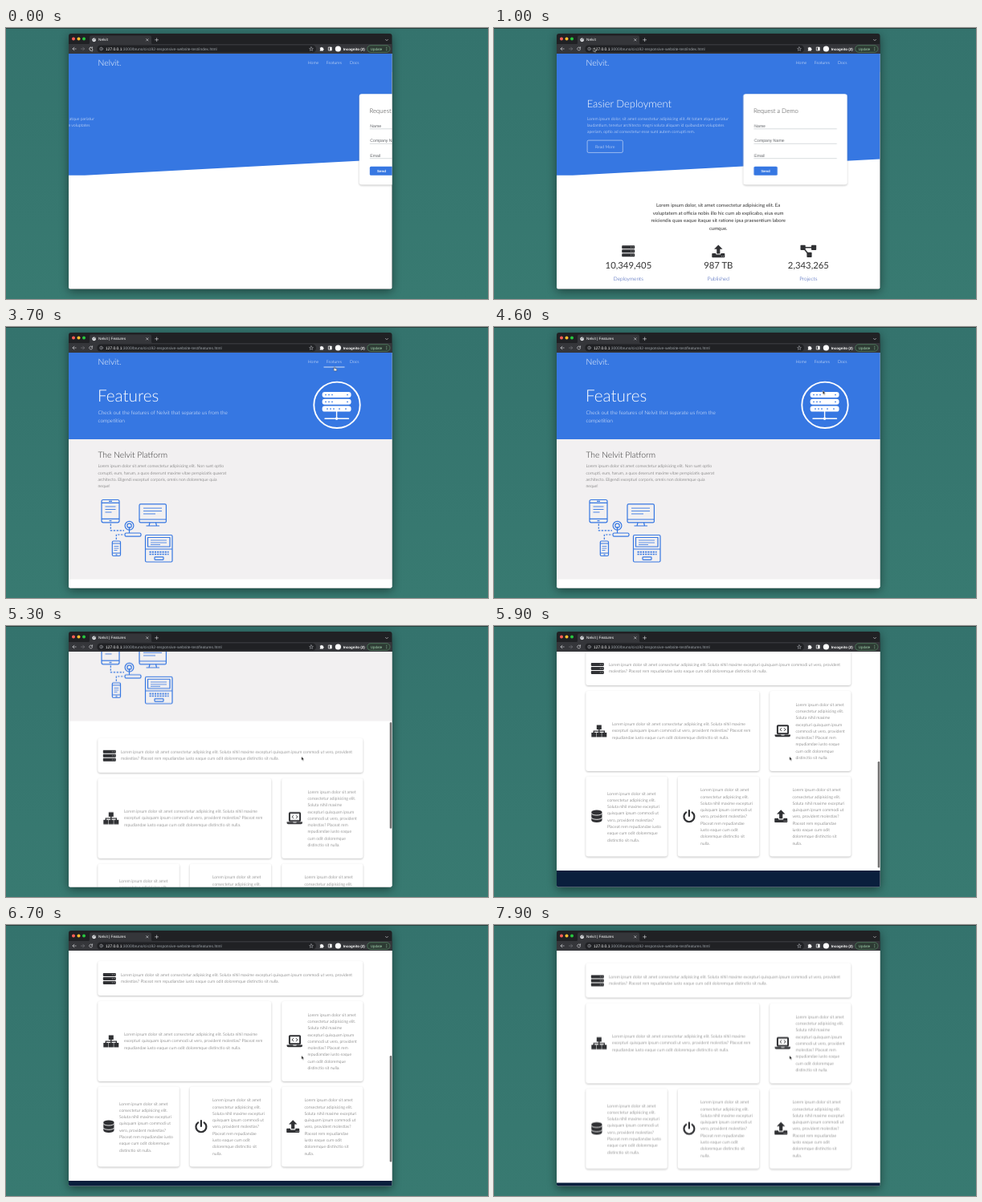
An HTML page that plays this animation: 600x338 px, repeating every 8000 ms.

```html
<!DOCTYPE html>
<html lang="en">
<head>
<meta charset="utf-8">
<title>Website preview</title>
<style>
html, body { margin: 0; width: 100%; height: 100%; overflow: hidden; background: #36766f; }
svg { display: block; width: 100vw; height: 100vh; }
text { font-family: Lato, sans-serif; font-weight: 300; font-size: 5.18px; text-rendering: geometricPrecision; white-space: pre; }
.ui, .ui text { font-family: "Liberation Sans", Arial, sans-serif; font-weight: 400; }
.mid { text-anchor: middle; }
.white { fill: #fff; }
.body { fill: #484848; }
.link { fill: #1c3fa8; font-size: 6.47px; }
.count { font-size: 11.32px; font-weight: 400; }
.blue { fill: #3677e2; }
.card { fill: #fff; filter: drop-shadow(0 1px 1.2px rgba(0, 0, 0, .24)); }
.frame { filter: drop-shadow(0 3px 6px rgba(0, 0, 0, .45)); }
.line { fill: none; stroke: #fff; stroke-width: .8; stroke-linecap: round; stroke-linejoin: round; }
.dev { fill: none; stroke: #3677e2; stroke-width: 1.2; stroke-linejoin: round; }
.icon { fill: #303134; }

.from-left, .from-right, .from-below, .scroll, .thumb, .fade, .cursor,
.first, .second, .hover, .arrow { animation: 8s infinite both; }

.from-left { animation-name: fromLeft; }
.from-right { animation-name: fromRight; }
.from-below { animation-name: fromBelow; }
@keyframes fromLeft { 0% { transform: translateX(-182px); animation-timing-function: ease-in; } 12.5%, 100% { transform: none; } }
@keyframes fromRight { 0% { transform: translateX(129.4px); animation-timing-function: ease-in; } 12.5%, 100% { transform: none; } }
@keyframes fromBelow { 0% { transform: translateY(122px); animation-timing-function: ease-in; } 12.5%, 100% { transform: none; } }

.first, .second, .hover, .arrow { animation-timing-function: steps(1, end); }
.first { animation-name: first; }
.second { animation-name: second; }
.hover { animation-name: hover; }
.arrow { animation-name: arrow; }
@keyframes first { 0% { opacity: 1; } 41.25%, 100% { opacity: 0; } }
@keyframes second { 0% { opacity: 0; } 41.25%, 100% { opacity: 1; } }
@keyframes hover { 0% { opacity: 0; } 31.5% { opacity: 1; } 47%, 100% { opacity: 0; } }
@keyframes arrow { 0% { opacity: 1; } 31.5% { opacity: 0; } 47%, 100% { opacity: 1; } }

.scroll { animation-name: scroll; animation-timing-function: ease-in-out; }
.thumb { animation-name: thumb; animation-timing-function: ease-in-out; }
.fade { animation-name: fade; }
@keyframes scroll {
  0%, 61% { transform: none; }
  70%, 73.75% { transform: translateY(-305px); }
  83.75% { transform: translateY(-291px); }
  90%, 100% { transform: translateY(-288.5px); }
}
@keyframes thumb {
  0%, 61% { transform: none; }
  70%, 73.75% { transform: translateY(137px); }
  83.75% { transform: translateY(131px); }
  90%, 100% { transform: translateY(129.8px); }
}
@keyframes fade { 0%, 60.5% { opacity: 0; } 61.5%, 91% { opacity: 1; } 94%, 100% { opacity: 0; } }

.cursor { animation-name: cursor; animation-timing-function: ease-in-out; }
@keyframes cursor {
  0%, 4% { transform: translate(105px, 23.8px); }
  12.5%, 15% { transform: translate(123.7px, 24.8px); }
  32.5%, 44% { transform: translate(408.3px, 45.4px); }
  53%, 59% { transform: translate(409.3px, 79.2px); }
  66%, 100% { transform: translate(367.8px, 162.8px); }
}
</style>
</head>
<body>
<svg viewBox="0 0 600 338" preserveAspectRatio="none">
  <defs>
    <linearGradient id="wall" x2="0" y2="1">
      <stop stop-color="#34736d"/><stop offset="1" stop-color="#387a71"/>
    </linearGradient>
    <clipPath id="view"><path d="M78 32H480.5V323.5a2 2 0 0 1-2 2H80a2 2 0 0 1-2-2z"/></clipPath>

    <g id="nav">
      <rect class="blue" x="78" y="31.5" width="403" height="23.5"/>
      <g class="white">
        <text x="114.6" y="47.2" style="font-size:10.35px">Nelvit.</text>
        <text x="375.7" y="45.2">Home</text>
        <text x="398.8" y="45.2">Features</text>
        <text x="428" y="45.2">Docs</text>
      </g>
    </g>

    <!-- icons are centred on 0,0 -->
    <g id="server">
      <path class="icon" d="M-7.2-7H7.2a.8.8 0 0 1 .8.8v2.4a.8.8 0 0 1-.8.8H-7.2a.8.8 0 0 1-.8-.8v-2.4a.8.8 0 0 1 .8-.8zM-7.2-2H7.2a.8.8 0 0 1 .8.8v2.4a.8.8 0 0 1-.8.8H-7.2a.8.8 0 0 1-.8-.8v-2.4a.8.8 0 0 1 .8-.8zM-7.2 3H7.2a.8.8 0 0 1 .8.8v2.4a.8.8 0 0 1-.8.8H-7.2a.8.8 0 0 1-.8-.8v-2.4a.8.8 0 0 1 .8-.8z"/>
      <path class="line" stroke-width="1.2" d="M3.5-5h0M6-5h0M3.5 0h0M6 0h0M3.5 5h0M6 5h0"/>
    </g>
    <g id="upload">
      <path class="icon" d="M0-8 5.2-2.6H2.1V3H-2.1V-2.6H-5.2z"/>
      <path class="icon" d="M-7.2 2.5H-3.2V3.2a1 1 0 0 0 1 1H2.2a1 1 0 0 0 1-1V2.5H7.2a.8.8 0 0 1 .8.8V7a.8.8 0 0 1-.8.8H-7.2A.8.8 0 0 1-8 7V3.3a.8.8 0 0 1 .8-.8z"/>
      <path class="line" d="M4 6.3h0M6.2 6.3h0"/>
    </g>
  </defs>

  <rect width="600" height="338" fill="url(#wall)"/>
  <rect width="600" height="1" fill="#29433f"/>

  <!-- browser window -->
  <rect class="frame" x="78" y="7" width="402.5" height="318.5" rx="3" fill="#202124"/>
  <g class="ui">
    <circle cx="84" cy="13.6" r="2" fill="#ff5f57"/>
    <circle cx="90.5" cy="13.6" r="2" fill="#febc2e"/>
    <circle cx="97" cy="13.6" r="2" fill="#28c840"/>
    <path d="M78 20H102.5q1.5 0 1.5-1.5V11.5q0-2 2-2H179q2 0 2 2v7q0 1.5 1.5 1.5H480.5V32H78z" fill="#35363a"/>
    <circle cx="109.6" cy="14.8" r="2.4" fill="#e8eaed"/>
    <path d="M108.2 13.8l1.2.6.1 1.3M110.4 13l.3 1 .9.3" fill="none" stroke="#35363a" stroke-width=".6"/>
    <g class="white">
      <text class="first" x="115" y="16.4" style="font-size:4.7px">Nelvit</text>
      <text class="second" x="115" y="16.4" style="font-size:4.7px">Nelvit | Features</text>
    </g>
    <g class="line" style="stroke:#e1e3e6;stroke-width:.6">
      <path d="M174.6 13.6l2.4 2.4m0-2.4l-2.4 2.4M185.7 14.8h3.8m-1.9-1.9v3.8M472.5 14.3l1.5 1.5 1.5-1.5"/>
      <path d="M87.2 26H83m1.9-1.9L83 26l1.9 1.9"/>
      <path d="M93.4 26h4.2m-1.9-1.9 1.9 1.9-1.9 1.9" stroke="#7d8085"/>
      <path d="M107.3 24.8a2 2 0 1 0 .3 1.7M107.6 23.7v1.5h-1.5"/>
    </g>
    <rect x="113.3" y="21.4" width="272.7" height="9.2" rx="4.6" fill="#202124"/>
    <g class="line" style="stroke:#b8bbc0;stroke-width:.5">
      <circle cx="118.6" cy="26" r="1.9"/><path d="M118.6 25.8v1.1M118.6 24.9h0"/>
      <path d="M380 23.7l.7 1.6 1.7.2-1.3 1.1.4 1.7-1.5-.9-1.5.9.4-1.7-1.3-1.1 1.7-.2z"/>
    </g>
    <g style="font-size:4.9px" fill="#9aa0a6">
      <text class="first" x="124" y="27.8" style="font-size:4.9px"><tspan fill="#fff">127.0.0.1</tspan>:3000/bruno/cis192-responsive-website-test/index.html</text>
      <text class="second" x="124" y="27.8" style="font-size:4.9px"><tspan fill="#fff">127.0.0.1</tspan>:3000/bruno/cis192-responsive-website-test/features.html</text>
    </g>
    <path class="white" d="M390.8 24.6h1.2a.8.8 0 1 1 1.6 0h1.3v1.2a.8.8 0 1 1 0 1.6v1.2h-4.1v-1.3a.8.8 0 0 0 0-1.5z"/>
    <path d="M401.3 24h4v4h-4z" fill="none" stroke="#fff" stroke-width=".7"/><path class="white" d="M403.2 24h2v4h-2z"/>
    <circle class="white" cx="413.4" cy="26" r="3.6"/>
    <text class="white" x="419.8" y="27.7" style="font-size:4.5px;font-weight:700">Incognito (2)</text>
    <rect x="449.7" y="21.7" width="28.3" height="8.6" rx="4.3" fill="#2d3a33" stroke="#65a878" stroke-width=".5"/>
    <text x="453.8" y="27.6" fill="#a8dab5" style="font-size:4.5px">Update</text>
    <path class="line" style="stroke:#a8dab5" d="M473.8 24.3h0M473.8 26h0M473.8 27.7h0"/>
  </g>

  <g clip-path="url(#view)">
    <rect x="78" y="32" width="403" height="294" fill="#fff"/>

    <!-- home page -->
    <g class="first">
      <path class="blue" d="M78 54H480.5V163.6L98 183.7H78z"/>
      <use href="#nav"/>
      <g class="from-left white">
        <text x="115.7" y="99.2" style="font-size:12.94px">Easier Deployment</text>
        <text class="para" x="115.9" y="114.7">Lorem ipsum dolor, sit amet consectetur adipisicing elit. At totam atque pariatur|laudantium, tenetur architecto magni soluta aliquam id quibusdam voluptates|aperiam, optio ad consectetur esse sunt autem corrupti rem.</text>
        <rect x="116.1" y="140.1" width="44.2" height="15.3" rx="1.6" fill="none" stroke="#fff" stroke-width=".5"/>
        <text class="mid" x="138.2" y="149.7">Read More</text>
      </g>
      <g class="from-right">
        <rect class="card" x="310.3" y="82.2" width="129.4" height="113.2" rx="3.2"/>
        <text x="323.2" y="105.6" fill="#333" style="font-size:7.76px">Request a Demo</text>
        <g class="ui" fill="#5f6266">
          <text x="323.9" y="123.6">Name</text>
          <text x="323.9" y="142.1">Company Name</text>
          <text x="323.9" y="160.5">Email</text>
          <path d="M323.4 125.8H426.7M323.4 144.3H426.7M323.4 162.7H426.7" stroke="#a9b0b8" stroke-width=".45"/>
          <rect class="blue" x="323.4" y="172.8" width="29.4" height="11" rx="1.6"/>
          <text class="mid white" x="338.1" y="179.9" style="font-size:4.4px;font-weight:700">Send</text>
        </g>
      </g>
      <g class="from-below mid" fill="#333">
        <text class="para" x="279.2" y="223" data-lead="9.7" style="font-size:6.06px;font-weight:400">Lorem ipsum dolor, sit amet consectetur adipisicing elit. Ea|voluptatem at officia nobis illo hic cum ab explicabo, eius eum|reiciendis quas eaque itaque sit ratione ipsa praesentium labore|cumque.</text>
        <use href="#server" x="167.2" y="278.2"/>
        <use href="#upload" x="279.3" y="278.4"/>
        <g class="icon">
          <rect x="381.5" y="270.8" width="6.2" height="6.2" rx=".8"/>
          <rect x="395" y="270.8" width="6.2" height="6.2" rx=".8"/>
          <rect x="389.4" y="279.8" width="6.2" height="6.2" rx=".8"/>
          <path d="M387 273.8H396M386 275.5L391.5 282" fill="none" stroke="#303134" stroke-width="1.5"/>
        </g>
        <text class="count" x="167.4" y="299.8">10,349,405</text>
        <text class="count" x="279.3" y="299.8">987 TB</text>
        <text class="count" x="391.4" y="299.8">2,343,265</text>
        <text class="link" x="167.4" y="315.2">Deployments</text>
        <text class="link" x="279.3" y="315.2">Published</text>
        <text class="link" x="391.4" y="315.2">Projects</text>
      </g>
    </g>

    <!-- features page -->
    <g class="second">
      <rect x="78" y="32" width="403" height="294" fill="#fff"/>
      <g class="scroll">
        <rect class="blue" x="78" y="54" width="403" height="86"/>
        <use href="#nav"/>
        <g class="white">
          <text x="114" y="93.4" style="font-size:20.7px">Features</text>
          <text class="para" x="114.4" y="108.5" data-lead="10.35" style="font-size:6.47px">Check out the features of Nelvit that separate us from the|competition</text>
          <rect x="393.6" y="81" width="36" height="7" rx="3.2"/>
          <rect x="393.6" y="89.8" width="36" height="7" rx="3.2"/>
          <rect x="393.6" y="98.6" width="36" height="7" rx="3.2"/>
        </g>
        <circle class="line" cx="412" cy="97.3" r="28.7" style="stroke-width:1.9"/>
        <path class="line" style="stroke-width:1.4" d="M411.6 105V114M397 114.3H426.5"/>
        <circle class="white" cx="411.6" cy="114.3" r="1.8"/>
        <path class="line" style="stroke:#3677e2;stroke-width:1.7" d="M398 84.5h0M402 84.5h0M406 84.5h0M425 84.5h0M398 93.3h0M402 93.3h0M406 93.3h0M425 93.3h0M400 102.1h0M404 102.1h0M408 102.1h0M415 102.1h0M423 102.1h0"/>

        <rect x="78" y="140" width="403" height="174.6" fill="#f2f0f1"/>
        <text x="114.4" y="163.4" fill="#333" style="font-size:10.35px">The Nelvit Platform</text>
        <text class="para body" x="114.4" y="175.3">Lorem ipsum dolor sit amet consectetur adipisicing elit. Non sunt optio|corrupti, eum, harum, a quos deserunt maxime vitae perspiciatis quaerat|architecto. Eligendi excepturi corporis, omnis non doloremque quia|neque!</text>

        <g class="dev">
          <rect x="119" y="215.5" width="22" height="28.3" rx="2"/>
          <path d="M119 219.3h22M119 239.3h22M128 217.4h4M128.5 241.6h3"/>
          <path d="M123.5 224h13M123.5 227.5h13M123.5 231h8" stroke-width=".9"/>
          <rect x="166" y="220.8" width="33.4" height="23" rx="1.6"/>
          <path d="M166 240h33.4M179 244l-1 4M186.500 244l1 4M174.500 248h16.500"/>
          <path d="M171 226h23M171 229.500h23M171 233h15" stroke-width=".9"/>
          <rect x="148" y="257" width="20" height="4.2" rx="1.6"/>
          <path d="M153.5 257v-8"/>
          <circle cx="153.5" cy="247.8" r="5.4"/>
          <circle cx="153.5" cy="247.8" r="2.7"/>
          <rect x="132.3" y="267" width="10.2" height="18.5" rx="1.5"/>
          <path d="M132.300 270h10.200M132.300 282h10.200M136.500 283.800h2"/>
          <path d="M134.500 273.500h5.800M134.500 276h5.800M134.500 278.500h4" stroke-width=".8"/>
          <path d="M130.300 245.500V253.800H147M137.300 265V259H147" stroke-dasharray="2.4 1.5"/>
          <path d="M173.500 277V261q0-1.500 1.500-1.500h30.500q1.500 0 1.500 1.500v16zM176.500 262.500h27.500v11.500h-27.500zM173.500 277v14.500q0 1.500 1.500 1.500h30.500q1.500 0 1.500-1.500V277"/>
          <path d="M180 266h20M180 269h20M180 271.500h12" stroke-width=".8"/>
          <path d="M178.500 280.700h24M178.500 283.500h24" stroke-width="1.700" stroke-dasharray="2.200 1"/>
          <rect x="185" y="286.800" width="11" height="3.600" rx=".8"/>
        </g>

        <g transform="translate(0 305)">
          <g class="card">
            <rect x="114.300" y="31" width="330" height="43" rx="3"/>
            <rect x="114.300" y="81" width="216" height="100" rx="3"/>
            <rect x="343.200" y="81" width="101.200" height="100" rx="3"/>
            <rect x="114.300" y="187.500" width="101.500" height="100" rx="3"/>
            <rect x="228.700" y="187.500" width="101.500" height="100" rx="3"/>
            <rect x="343.200" y="187.500" width="101.200" height="100" rx="3"/>
          </g>
          <g class="body">
            <text class="para" x="143" y="50.100">Lorem ipsum dolor sit amet consectetur adipisicing elit. Soluta nihil maxime excepturi quisquam ipsum commodi ut vero, provident|molestias? Placeat rem repudiandae iusto eaque cum odit doloremque distinctio sit nulla.</text>
            <text class="para" x="147" y="124.100">Lorem ipsum dolor sit amet consectetur adipisicing elit. Soluta nihil maxime|excepturi quisquam ipsum commodi ut vero, provident molestias? Placeat rem|repudiandae iusto eaque cum odit doloremque distinctio sit nulla.</text>
            <text class="para" x="375.400" y="99.700">Lorem ipsum dolor sit amet|consectetur adipisicing elit.|Soluta nihil maxime|excepturi quisquam ipsum|commodi ut vero, provident|molestias? Placeat rem|repudiandae iusto eaque|cum odit doloremque|distinctio sit nulla.</text>
            <text class="para" x="141" y="210.600">Lorem ipsum dolor sit amet|consectetur adipisicing elit.|Soluta nihil maxime excepturi|quisquam ipsum commodi ut|vero, provident molestias?|Placeat rem repudiandae iusto|eaque cum odit doloremque|distinctio sit nulla.</text>
            <text class="para" x="257" y="206.300">Lorem ipsum dolor sit amet|consectetur adipisicing elit.|Soluta nihil maxime excepturi|quisquam ipsum commodi ut|vero, provident molestias?|Placeat rem repudiandae|iusto eaque cum odit|doloremque distinctio sit|nulla.</text>
            <text class="para" x="371.400" y="206.300">Lorem ipsum dolor sit amet|consectetur adipisicing elit.|Soluta nihil maxime excepturi|quisquam ipsum commodi ut|vero, provident molestias?|Placeat rem repudiandae|iusto eaque cum odit|doloremque distinctio sit|nulla.</text>
          </g>
          <use href="#server" x="128.800" y="52.900"/>
          <use href="#upload" x="357.200" y="237.200"/>
          <g class="icon">
            <path d="M127.800 123.500h6v5.500h-6zM121.300 133h6v5.500h-6zM127.800 133h6v5.500h-6zM134.300 133h6v5.500h-6z"/>
            <path d="M130.800 128v6M124.300 134v-2.900h13v2.900" fill="none" stroke="#303134" stroke-width="1.400"/>
            <rect x="352.900" y="124.200" width="13.200" height="10" rx=".8" fill="none" stroke="#303134" stroke-width="2"/>
            <path d="M349.500 135.400h7.500l.8 1h3.400l.8-1h7v1q0 1.800-1.800 1.800h-15.900q-1.800 0-1.800-1.800z"/>
            <path d="M358 127.200l-1.900 2 1.900 2M361 127.200l1.900 2-1.900 2" fill="none" stroke="#303134" stroke-width="1"/>
            <path d="M121.300 232a6.600 2.600 0 0 1 13.200 0v10.300a6.600 2.600 0 0 1-13.200 0z"/>
            <path d="M121.300 233.600a6.600 2.400 0 0 0 13.200 0M121.300 238.900a6.600 2.400 0 0 0 13.200 0" fill="none" stroke="#fff" stroke-width=".9"/>
            <path d="M239.200 232.400a6.500 6.500 0 1 0 7.400 0M242.900 230v7" fill="none" stroke="#303134" stroke-width="2.200" stroke-linecap="round"/>
          </g>
          <rect x="78" y="305" width="403" height="77" fill="#0a1f3d"/>
        </g>
      </g>
      <g class="fade"><rect class="thumb" x="477.700" y="32" width="2.500" height="132.500" rx="1.200" fill="#737373"/></g>
    </g>

    <rect class="hover white" x="395.500" y="49.600" width="26" height=".8"/>
  </g>

  <g class="cursor">
    <path class="arrow" d="M0 0V4.600L1.100 3.700 1.900 5.400 2.700 5 1.900 3.400H3.300z" fill="#000" stroke="#fff" stroke-width=".45"/>
    <path class="hover" d="M0 0q.6-.5 1 0V1.800L2.900 2.200q.6.200.5.900L3 4.900H.4L-1 2.900q0-.6.600-.5L0 2.700z" fill="#fff" stroke="#000" stroke-width=".4"/>
  </g>
</svg>
<script>
// Break each paragraph into its lines.
for (const para of document.querySelectorAll('.para')) {
  const lead = para.dataset.lead || 8.28;
  const spans = para.textContent.split('|').map((line, i) => {
    const span = document.createElementNS(para.namespaceURI, 'tspan');
    span.setAttribute('x', para.getAttribute('x'));
    span.setAttribute('dy', i ? lead : 0);
    span.textContent = line;
    return span;
  });
  para.replaceChildren(...spans);
}
</script>
</body>
</html>
```
